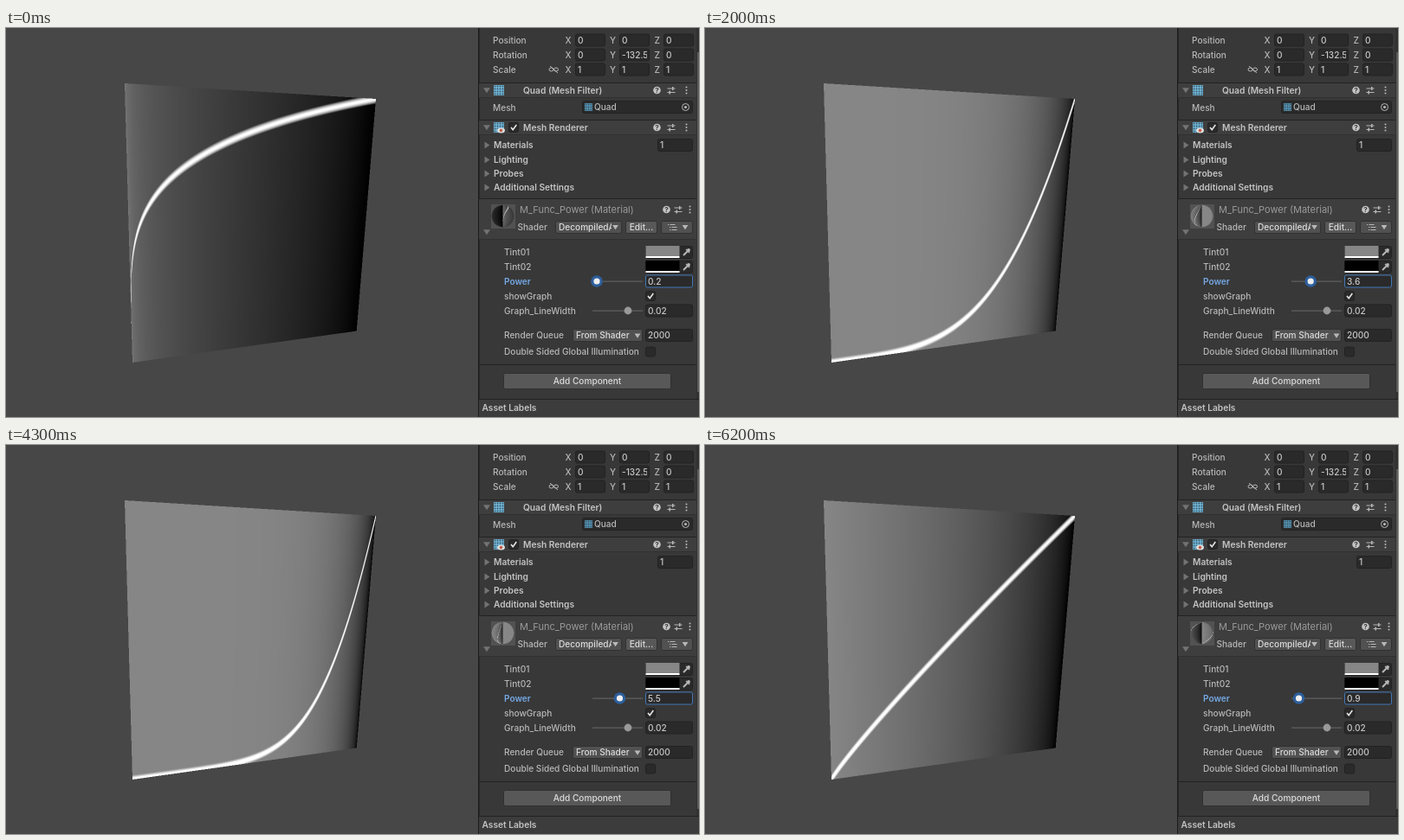
Write an HTML page with a canvas that moves like this. It is 800x450 px and loops after 6.6 s.

```html
<!DOCTYPE html>
<html lang="en">
<head>
<meta charset="utf-8">
<title>Power function shader</title>
<style>
html, body { margin: 0; width: 100%; height: 100%; overflow: hidden; background: #474747; }
canvas { display: block; }
</style>
</head>
<body>
<canvas id="stage" width="800" height="450"></canvas>
<script>
const ctx = document.getElementById('stage').getContext('2d');
const LOOP = 6600, STEP = 100;
const TINT = 0.238, LINE_WIDTH = 0.02; // linear light

// [tick, power] while the slider is dragged
const DRAG = [[0, .2], [4, .4], [8, .7], [10, 1.4], [14, 3], [16, 3.5], [18, 3.8], [19, 3.8], [20, 3.64],
  [23, 2.4], [26, 1.4], [29, 1], [32, .9], [33, .9], [35, 1.4], [37, 2], [40, 3.3], [43, 5.5], [45, 6],
  [47, 5.6], [51, 3.5], [54, 2.3], [55, 2.1], [58, 1.5], [61, .9], [66, .9]];

function powerAt(ms) {
  const tick = Math.floor((ms % LOOP) / STEP);
  const i = DRAG.findIndex(key => key[0] > tick);
  const [t0, p0] = DRAG[i - 1], [t1, p1] = DRAG[i];
  return p0 + (p1 - p0) * (tick - t0) / (t1 - t0);
}

// ---- shaded surfaces ----
const toSRGB = c => 255 * (c <= .0031308 ? 12.92 * c : 1.055 * c ** (1 / 2.4) - .055);

function shade(u, v, power) {
  const y = u ** power;
  const s = 1 - Math.abs(v - y) / LINE_WIDTH;
  const line = s > 0 ? s * s * (3 - 2 * s) : 0;
  return toSRGB(Math.min(1, TINT * (1 - y) + line));
}

// Surface with 2x2 samples per pixel; toUV returns [u, v] or null when outside.
function makeSurface(x, y, w, h, toUV) {
  const canvas = document.createElement('canvas');
  canvas.width = w;
  canvas.height = h;
  const c = canvas.getContext('2d'), image = c.createImageData(w, h);
  const samples = [];
  for (let j = 0; j < h; j++) for (let i = 0; i < w; i++) {
    const uvs = [];
    for (const dy of [.25, .75]) for (const dx of [.25, .75]) {
      const uv = toUV(x + i + dx, y + j + dy);
      if (uv) uvs.push(uv[0], uv[1]);
    }
    if (uvs.length) samples.push({ at: (j * w + i) * 4, uvs });
  }
  return {
    render(power) {
      for (const { at, uvs } of samples) {
        const n = uvs.length / 2;
        let sum = 0;
        for (let k = 0; k < uvs.length; k += 2) sum += shade(uvs[k], uvs[k + 1], power);
        image.data.fill(sum / n, at, at + 3);
        image.data[at + 3] = 255 * n / 4;
      }
      c.putImageData(image, 0, 0);
    },
    draw() { ctx.drawImage(canvas, x, y); }
  };
}

// Screen to UV for a quad seen in perspective: corners BL, BR, TR, TL
function quadMap([x0, y0], [x1, y1], [x2, y2], [x3, y3]) {
  const sx = x0 - x1 + x2 - x3, sy = y0 - y1 + y2 - y3;
  const dx1 = x1 - x2, dy1 = y1 - y2, dx2 = x3 - x2, dy2 = y3 - y2;
  const den = dx1 * dy2 - dx2 * dy1;
  const g = (sx * dy2 - dx2 * sy) / den, h = (dx1 * sy - sx * dy1) / den;
  const a = x1 - x0 + g * x1, b = x3 - x0 + h * x3, c = x0;
  const d = y1 - y0 + g * y1, e = y3 - y0 + h * y3, f = y0;
  return (x, y) => {
    const w = (d * h - e * g) * x + (b * g - a * h) * y + a * e - b * d;
    const u = ((e - f * h) * x + (c * h - b) * y + b * f - c * e) / w;
    const v = ((f * g - d) * x + (a - c * g) * y + c * d - a * f) / w;
    return u >= 0 && u <= 1 && v >= 0 && v <= 1 ? [u, v] : null;
  };
}

// UV of a sphere with its seam facing the viewer; the texture wraps twice around
function sphereMap(cx, cy, r) {
  return (x, y) => {
    const sx = (x - cx) / r, sy = (cy - y) / r;
    if (sx * sx + sy * sy > 1) return null;
    const lon = Math.asin(sx / Math.sqrt(1 - sy * sy)) / Math.PI;
    return [lon < 0 ? 1 + lon : lon, Math.asin(sy) / Math.PI + .5];
  };
}

const quad = makeSurface(136, 63, 293, 326, quadMap([146, 387], [404.7, 350.5], [427, 82], [137, 64]));
const ball = makeSurface(560, 204, 28, 28, sphereMap(573.5, 217.5, 12.8));

// ---- drawing helpers ----
const GREY = '#b8b8b8', DARK = '#222222';

function text(str, x, y, { color = GREY, weight = 500, size = 10.1, align = 'left' } = {}) {
  ctx.font = `${weight} ${size}px Inter, sans-serif`;
  ctx.textAlign = align;
  ctx.fillStyle = color;
  ctx.fillText(str, x, y + 3.7);
}
const bold = (str, x, y) => text(str, x, y, { weight: 600, size: 10.2, color: '#c4c4c4' });

function rect(x, y, w, h, color) {
  ctx.fillStyle = color;
  ctx.fillRect(x, y, w, h);
}
function box(x, y, w, h, fill, stroke, r = 2) {
  ctx.beginPath();
  ctx.roundRect(x + .5, y + .5, w - 1, h - 1, r);
  ctx.fillStyle = fill;
  ctx.fill();
  ctx.strokeStyle = stroke;
  ctx.lineWidth = 1;
  ctx.stroke();
}
function path(points, color, width) {
  ctx.beginPath();
  points.forEach(([x, y]) => ctx.lineTo(x, y));
  if (width) {
    ctx.strokeStyle = color;
    ctx.lineWidth = width;
    ctx.stroke();
  } else {
    ctx.fillStyle = color;
    ctx.fill();
  }
}
function dot(x, y, r, color) {
  ctx.beginPath();
  ctx.arc(x, y, r, 0, 7);
  ctx.fillStyle = color;
  ctx.fill();
}
function ring(x, y, rx, ry, color) {
  ctx.beginPath();
  ctx.ellipse(x, y, rx, ry, 0, 0, 7);
  ctx.strokeStyle = color;
  ctx.lineWidth = 1;
  ctx.stroke();
}
function clipped(x, y, w, h, draw) {
  ctx.save();
  ctx.beginPath();
  ctx.rect(x, y, w, h);
  ctx.clip();
  draw();
  ctx.restore();
}
function field(x, y, w, value, border = DARK) {
  box(x, y - 7.5, w, 15, '#2a2a2a', border);
  clipped(x, y - 7, w - 3, 15, () => text(value, x + 3, y, { color: '#c8c8c8' }));
}
const down = (x, y, s, color) => path([[x - s, y - s * .7], [x + s, y - s * .7], [x, y + s * .8]], color);
const right = (x, y) => path([[x - 2.5, y - 4], [x + 3.5, y], [x - 2.5, y + 4]], '#737373');
const button = (x, y, w, h, fill = '#515151') => box(x, y, w, h, fill, '#303030');

function checkbox(x, y, on) {
  box(x, y - 6, 12, 12, '#2a2a2a', DARK);
  if (on) path([[x + 3, y], [x + 5.2, y + 2.6], [x + 9.3, y - 3]], '#e4e4e4', 1.6);
}
function gridIcon(x, y, size, cells, color) {
  rect(x, y, size, size, color);
  const cell = size / cells;
  for (let i = 0; i < cells; i++) for (let j = 0; j < cells; j++)
    rect(x + i * cell + .5, y + j * cell + .5, cell - 1, cell - 1, '#35576a');
}
function headerIcons(xs, y) {
  dot(xs[0], y, 4.3, '#c4c4c4');
  text('?', xs[0], y - .5, { size: 8, weight: 700, color: '#383838', align: 'center' });
  path([[xs[1] - 4.5, y - 2], [xs[1] + 4.5, y - 2]], GREY, 1);
  path([[xs[1] - 4.5, y + 2.5], [xs[1] + 4.5, y + 2.5]], GREY, 1);
  rect(xs[1] + 1, y - 4, 1.5, 4, GREY);
  rect(xs[1] - 2.5, y + .5, 1.5, 4, GREY);
  for (const d of [-3.5, 0, 3.5]) dot(xs[2], y + d, 1, GREY);
}
function header(y, h) {
  rect(546, y, 251, h, '#3e3e3e');
  rect(546, y, 251, 1, DARK);
  rect(546, y + h, 251, 1, '#303030');
}
function swatch(y, color) {
  box(738, y - 7, 55, 15, '#2a2a2a', DARK);
  rect(738.5, y - 7, 39, 12, color);
  rect(738.5, y + 5, 39, 2, '#ffffff');
  path([[782, y + 4], [787, y - 1]], GREY, 2);
  path([[785, y - 3], [789, y + 1]], GREY, 1.3);
  dot(788, y - 2, 1.9, GREY);
}
const track = y => rect(677, y - .5, 58, 1.3, '#5e5e5e');

// ---- inspector ----
function drawTransform() {
  const rows = [['Position', 14, '0', '0', '0'], ['Rotation', 31, '0', '-132.5', '0'], ['Scale', 48, '1', '1', '1']];
  for (const [label, y, ...values] of rows) {
    text(label, 562, y);
    values.forEach((value, i) => {
      text('XYZ'[i], 645.5 + i * 51.5, y);
      field(657 + i * 51, y, 35, value);
    });
  }
  ring(629.5, 48, 2.5, 2, GREY);
  ring(635, 48, 2.5, 2, GREY);
  path([[628, 44], [637, 52]], GREY, 1);
}

function drawMesh() {
  header(63, 17);
  down(555, 72, 4, '#737373');
  gridIcon(563, 66, 12, 4, '#82cdf0');
  bold('Quad (Mesh Filter)', 597, 72);
  headerIcons([751.5, 768, 785.5], 72);

  text('Mesh', 562, 92);
  field(665, 91.5, 128, '');
  gridIcon(668, 87, 9, 3, '#5d9dbd');
  text('Quad', 679, 91.5);
  ring(784.5, 91.5, 4, 4, GREY);
  dot(784.5, 91.5, 1.6, GREY);

  header(106, 17);
  down(555, 115, 4, '#737373');
  gridIcon(563, 109, 12, 4, '#82cdf0');
  ctx.beginPath();
  ctx.ellipse(571.5, 118.5, 4.5, 3, 0, 0, 7);
  ctx.fillStyle = '#dddddd';
  ctx.fill();
  dot(571.5, 118.5, 1.7, '#c0563f');
  checkbox(580, 115, true);
  bold('Mesh Renderer', 597, 115);
  headerIcons([751.5, 768, 785.5], 115);

  [['Materials', 135.5], ['Lighting', 152.5], ['Probes', 168.5], ['Additional Settings', 184.5]].forEach(([label, y]) => {
    right(555, y);
    bold(label, 563, y);
  });
  field(752, 135.5, 41, '1');
}

function drawMaterialHeader() {
  header(197, 47);
  rect(560, 204, 28, 28, '#525252');
  ball.draw();
  text('M_Func_Power (Material)', 593, 210, { size: 11, weight: 400, color: '#9a9a9a' });
  headerIcons([762.5, 776, 789.5], 210);
  down(555, 236, 4, '#737373');
  text('Shader', 590.5, 230);
  button(634, 223, 77, 15);
  clipped(634, 222, 65, 16, () => text('DecompiledArt', 638, 230, { color: '#dddddd' }));
  down(703.5, 230.5, 3.4, GREY);
  button(715, 223, 37, 15, '#585858');
  text('Edit...', 733.5, 230, { color: '#dddddd', align: 'center' });
  button(756, 223, 37, 15);
  for (const [i, d] of [-3, 0, 3].entries()) {
    rect(764 + (i ? 2 : 0), 230 + d, 1.3, 1, GREY);
    rect(766.5 + (i ? 2 : 0), 230 + d, 6, 1, GREY);
  }
  down(784, 230.5, 3.4, GREY);
}

function drawMaterial(power) {
  text('Tint01', 575, 259);
  swatch(259, '#868686');
  text('Tint02', 575, 276);
  swatch(276, '#000000');

  text('Power', 575, 293, { color: '#75a9e6', weight: 600 });
  track(293);
  const thumb = 681 + 5 * power;
  dot(thumb, 293, 6.8, '#2d5f9c');
  dot(thumb, 293, 3.6, '#eeeeee');
  field(738, 293, 55, power.toFixed(1), '#4277b5');

  text('showGraph', 575, 310);
  checkbox(738, 310, true);
  text('Graph_LineWidth', 575, 327);
  track(327);
  dot(718, 327, 4.4, '#999999');
  field(738, 327, 55, '0.02');

  text('Render Queue', 575, 355.5);
  button(654, 348, 81, 15);
  text('From Shader', 658, 355.5, { color: '#dddddd' });
  down(729, 356, 3.4, GREY);
  field(738, 355.5, 55, '2000');
  text('Double Sided Global Illumination', 575, 374.5);
  checkbox(738, 374.5, false);
}

function drawFooter() {
  rect(546, 389, 251, 1, DARK);
  button(574, 399, 194, 19, '#585858');
  text('Add Component', 671, 408.5, { color: '#dddddd', align: 'center' });
  rect(546, 429, 254, 21, '#3c3c3c');
  rect(546, 429, 254, 1, DARK);
  bold('Asset Labels', 549.5, 439.5);
}

function drawScene(power) {
  rect(0, 0, 800, 450, '#474747');
  quad.draw();
  rect(545, 0, 255, 450, '#383838');
  rect(545, 0, 1.5, 450, '#1b1b1b');
  rect(797, 0, 3, 429, '#323232');
  rect(798, 28, 2, 393, '#5c5c5c');
  drawTransform();
  drawMesh();
  drawMaterialHeader();
  drawMaterial(power);
  drawFooter();
}

let shown = null;
function frame() {
  const power = powerAt(performance.now());
  if (power !== shown) {
    shown = power;
    quad.render(power);
    ball.render(power);
    drawScene(power);
  }
  requestAnimationFrame(frame);
}
frame();
</script>
</body>
</html>
```
